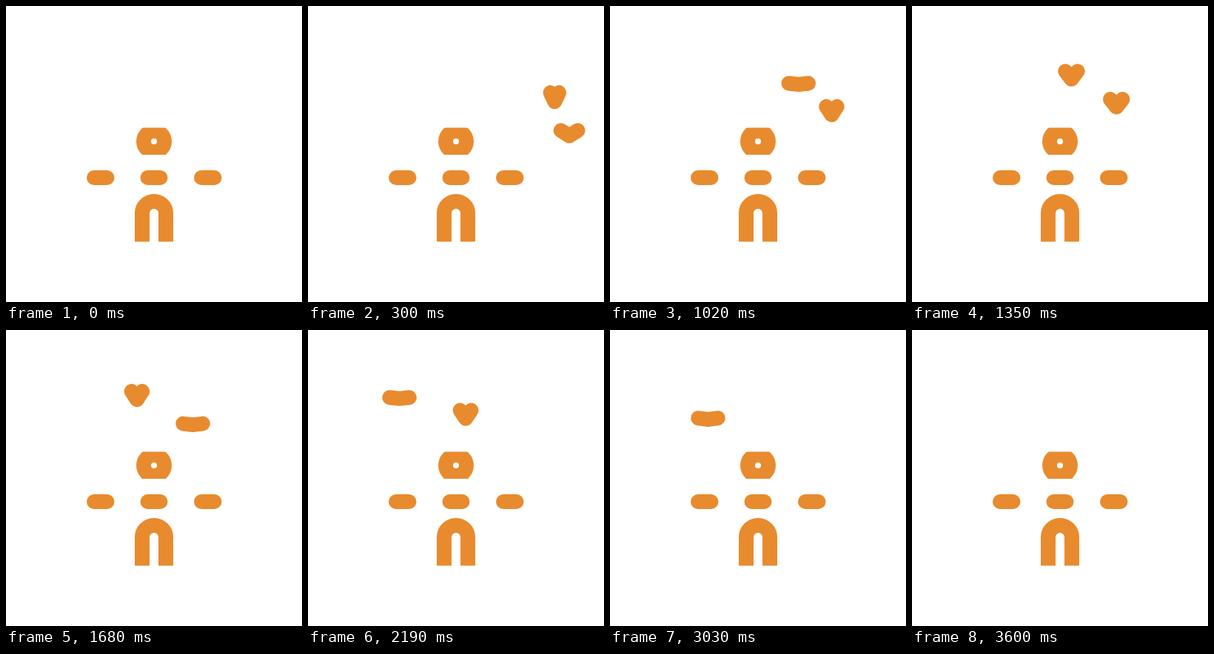
These frames come from a looping animation (400 by 400 pixels, 5630 ms). An HTML page:

```html
<!DOCTYPE html>
<html lang="en">
<head>
<meta charset="utf-8">
<title>Birds over a house</title>
<style>
  html, body { margin: 0; width: 100%; height: 100%; overflow: hidden; background: #fff; }
  svg { display: block; width: 100vw; height: 100vh; }
  .line { fill: none; stroke: #e88b2e; stroke-width: 20; }
  .round { stroke-linecap: round; stroke-linejoin: round; }
</style>
</head>
<body>
<svg viewBox="0 0 400 400">
  <clipPath id="band"><rect x="170" y="164.5" width="60" height="36.5"/></clipPath>
  <circle cx="200" cy="183" r="24" fill="#e88b2e" clip-path="url(#band)"/>
  <circle cx="200" cy="183" r="4" fill="#fff"/>
  <path class="line round" d="M119 232h17.5M191.5 232h17M264 232h17.5"/>
  <path class="line" d="M184 318.5V280a16 16 0 0 1 32 0V318.5"/>
  <path class="line round bird"/>
  <path class="line round bird"/>
</svg>
<script>
const LOOP = 5630, STEP = 30, FLAP = 1180, WING = 13.4;

// Each bird glides along one cubic Bézier; its wings are flat at time `flat`.
const birds = [
  { from: 30, to: 2910, flat: 945, x: [357, 281, 112, 74], y: [140, 100, 76.5, 104.5] },
  { from: 240, to: 3600, flat: 575, x: [358, 266.5, 219.5, 60.5], y: [178, 129, 95.5, 135] }
];
const shapes = document.querySelectorAll('.bird');

function bezier([a, b, c, d], u) {
  const v = 1 - u;
  return v * v * v * a + 3 * v * v * u * b + 3 * v * u * u * c + u * u * u * d;
}

function birdPath(bird, t) {
  if (t < bird.from || t >= bird.to) return '';
  const u = (t - bird.from) / (bird.to - bird.from);
  const x = bezier(bird.x, u), y = bezier(bird.y, u);
  const degrees = 35 - 31 * Math.cos((t - bird.flat) / FLAP * 2 * Math.PI);
  const lift = degrees * Math.PI / 180;
  const dx = WING * Math.cos(lift), tip = y - WING * Math.sin(lift);
  return `M${x - dx} ${tip}L${x} ${y}L${x + dx} ${tip}`;
}

const start = performance.now();
function draw() {
  const t = Math.floor((performance.now() - start) % LOOP / STEP) * STEP;
  birds.forEach((bird, i) => shapes[i].setAttribute('d', birdPath(bird, t)));
  requestAnimationFrame(draw);
}
draw();
</script>
</body>
</html>
```
